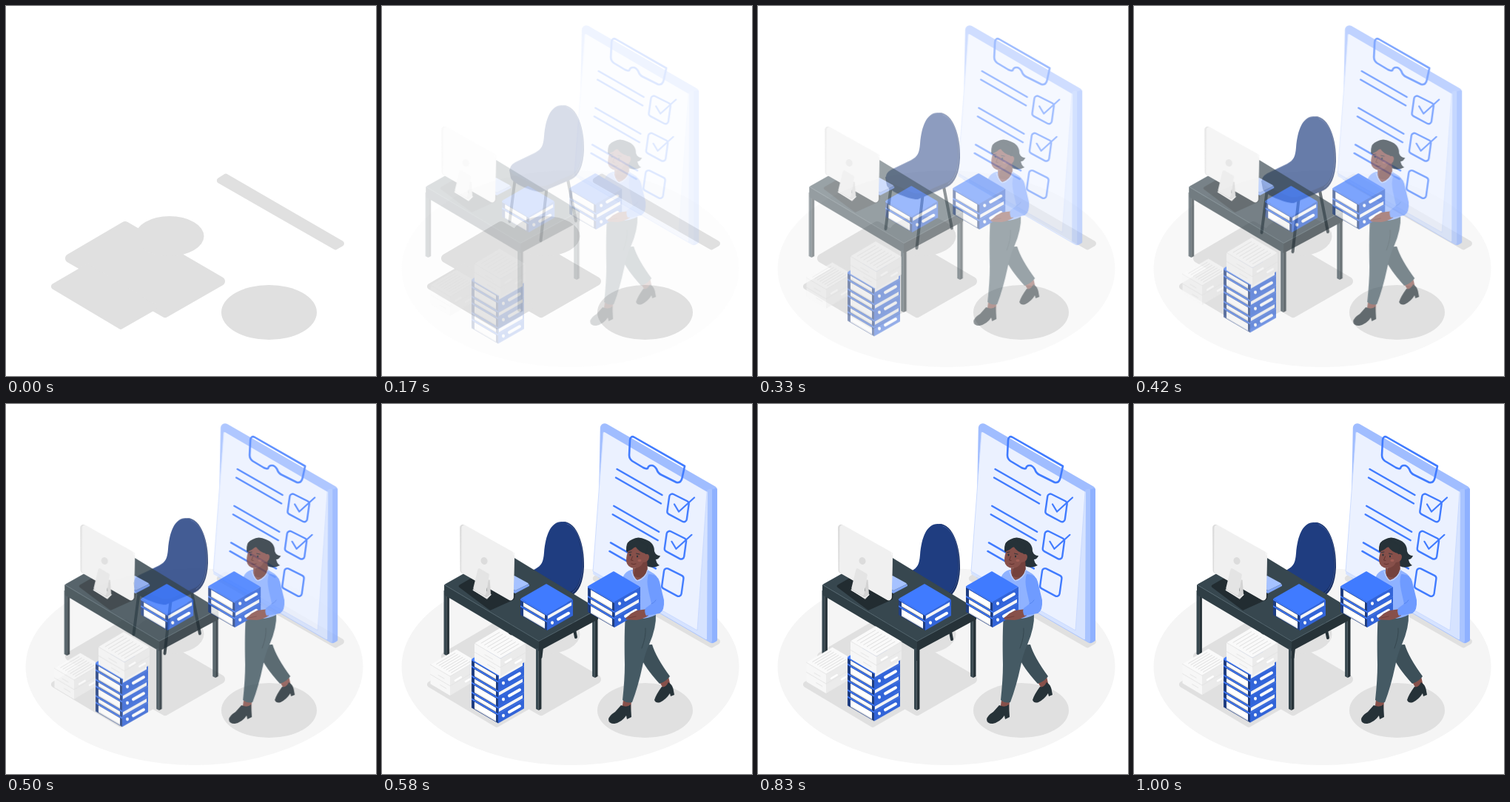
An HTML page with a canvas that plays this animation: 500x500 px, repeating every 1.04 s.

```html
<!DOCTYPE html>
<html lang="en">
<head>
<meta charset="utf-8">
<title>Office move</title>
<style>
html, body { margin: 0; width: 100%; height: 100%; overflow: hidden; background: #fff; }
canvas { display: block; width: 100vw; height: 100vh; }
</style>
</head>
<body>
<canvas id="stage"></canvas>
<script>
const SIZE = 500, LOOP = 1040, STEP = 1000 / 24;
const SLIDE = 30, FLOAT = 3, START = 80, RISE = 500, REST = 1;
const BLUE = '#407bff', SPINE = '#3264d8', NAVY = '#1f3d80';
const DARK = '#263238', SLATE = '#37474f', STEEL = '#455a64', SKIN = '#87504a';
const dpr = Math.max(1, window.devicePixelRatio || 1);

const stage = document.getElementById('stage');
const view = prepare(stage);
let c = view;

function prepare(canvas) {
  canvas.width = canvas.height = SIZE * dpr;
  const ctx = canvas.getContext('2d');
  ctx.scale(dpr, dpr);
  ctx.lineCap = ctx.lineJoin = 'round';
  return ctx;
}

// Draws a group once, flattened, so that it can fade as a whole.
function layer(draw) {
  const canvas = document.createElement('canvas');
  c = prepare(canvas);
  draw();
  c = view;
  return canvas;
}

function shape(color, d) {
  c.fillStyle = color;
  c.fill(new Path2D(d));
}

function line(color, width, d) {
  c.strokeStyle = color;
  c.lineWidth = width;
  c.stroke(new Path2D(d));
}

function oval(color, x, y, rx, ry = rx, turn = 0) {
  c.fillStyle = color;
  c.beginPath();
  c.ellipse(x, y, rx, ry, turn, 0, Math.PI * 2);
  c.fill();
}

// Closed path with rounded corners through flat x, y pairs.
function trace(r, p) {
  const n = p.length;
  c.beginPath();
  c.moveTo((p[n - 2] + p[0]) / 2, (p[n - 1] + p[1]) / 2);
  for (let i = 0; i < n; i += 2) {
    const j = (i + 2) % n;
    c.arcTo(p[i], p[i + 1], (p[i] + p[j]) / 2, (p[i + 1] + p[j + 1]) / 2, r);
  }
  c.closePath();
}

function poly(color, r, ...p) {
  trace(r, p);
  c.fillStyle = color;
  c.fill();
}

function outline(color, width, r, ...p) {
  trace(r, p);
  c.strokeStyle = color;
  c.lineWidth = width;
  c.stroke();
}

// Vertical iso wall from (x, y), spanning dx, dy and falling by h.
function wall(color, x, y, dx, dy, h) {
  poly(color, 0, x, y, x + dx, y + dy, x + dx, y + dy + h, x, y + h);
}

function binder(x, y, thick) {
  const h = thick ? 13 : 9;
  wall(NAVY, x, y, -36, -21, h);
  wall(SPINE, x, y, 35, -20, h);
  wall('#fff', x - 3, y + 1, -29, -17, h - 3.5);
  wall('#e0e0e0', x - 3, y + h - 4, -29, -17, 1);
  wall(BLUE, x, y, -36, -21, 2);
  if (thick) {
    line('#fff', 4, `M${x + 15} ${y - 2.2}L${x + 29} ${y - 10.2}`);
    oval('#fff', x + 7, y + 2.6, 2, 2.4);
  } else {
    wall('#f5f5f5', x + 1, y + 2, 32, -18.3, 4.5);
  }
  poly(BLUE, 1, x, y, x - 36, y - 21, x - 1, y - 41, x + 35, y - 20);
}

// Bottom binder first; each letter is a thick (A) or thin (B) one.
function pile(x, y, kinds) {
  for (const k of kinds) {
    y -= k === 'A' ? 13 : 9;
    binder(x, y, k === 'A');
  }
}

function paperBox(x, y, w, d, h) {
  const a = w * .59, b = d * .59;
  wall('#f7f7f7', x, y, -w, -a, h);
  wall('#ebebeb', x, y, d, -b, h);
  poly('#fafafa', 1, x, y, x - w, y - a, x - w + d, y - a - b, x + d, y - b);
  for (let i = 1; i < 8; i++) {
    const q = i / 8, px = x - w * q, py = y - a * q;
    line('#dcdcdc', .9, `M${px + d * .14} ${py - b * .14}L${px + d * .86} ${py - b * .86}`);
  }
  line('#e3e3e3', .8, `M${x - w} ${y - a}L${x} ${y}L${x + d} ${y - b}M${x - w} ${y - a + h / 2}L${x} ${y + h / 2}L${x + d} ${y - b + h / 2}`);
  line('#fff', 2.6, `M${x + d * .2} ${y + h * .38 - b * .2}l${d * .22} ${-b * .22}M${x + d * .6} ${y + h * .75 - b * .6}l${d * .22} ${-b * .22}`);
  line('#e6e6e6', 1, `M${x - w * .6} ${y + h * .3 - a * .6}l${w * .3} ${a * .3}M${x - w * .5} ${y + h * .75 - a * .5}l${w * .3} ${a * .3}`);
}

function floor() {
  oval('#f5f5f5', 254.5, 355, 228, 133);
}

function shadows() {
  const g = '#e0e0e0';
  poly(g, 4, 281, 236, 297, 226, 461, 321, 445, 330);
  poly(g, 6, 74, 341, 161, 290, 302, 372, 215, 422);
  poly(g, 4, 57, 379, 110, 348, 208, 407, 155, 437.5);
  oval(g, 221, 311, 46.5, 27);
  oval(g, 355.5, 414, 64.5, 37);
}

function checkbox(x, y, ticked) {
  outline(BLUE, 2.4, 4, x, y, x + 26, y + 13, x + 22, y + 42, x - 4, y + 28);
  if (ticked) line(BLUE, 2.2, `M${x + 6} ${y + 16}L${x + 12} ${y + 26}L${x + 33} ${y + 7}`);
}

function board() {
  poly('#a0bdff', 6, 296, 22, 454, 113, 454, 320, 447, 324, 292, 234);
  poly('#8fb1ff', 2, 446, 116, 454, 113, 454, 320, 446, 324);
  poly('#a9c4ff', 2, 440, 116, 447, 114, 447, 323, 440, 320);
  poly('#d6e3ff', 1, 300, 38, 441, 119, 440, 319, 286, 230);
  poly('#ebf1ff', 1.5, 300, 37, 440, 119, 427, 306, 286, 226);
  line('#c6d7ff', .8, 'M440 119L427 306L286 226L300 38');
  for (let i = 0; i < 3; i++) {
    const x = 318.5 - 4.3 * i, y = 88 + 49.7 * i;
    line(BLUE, 2.4, `M${x} ${y}l61 35M${x - 1.5} ${y + 11.5}l61 35`);
    checkbox(390 - 3.6 * i, 119.5 + 50.3 * i, i < 2);
  }
  line(BLUE, 2.6, 'M410 84L406.5 100Q405 107 399 106L379 96Q374 94 372 88Q369 83 365 83Q361 83 360 87Q358 88 354 86L339 77Q335 74 335 69L336 49Q337 42 342 45Z');
}

function chair() {
  line(DARK, 4, 'M180 258L172.5 317M223 268L214.5 343M250 255L262 316');
  shape('#172e62', 'M245 160C264 160 274 192 273 221C272 242 266 255 256 260L216 277C207 278 176 266 174 258L172 247L214 222Z');
  shape(NAVY, 'M243 160C228 160 221 178 219 202C218 214 216 219 207 224L180 237C170 243 171 251 182 256L209 268C218 271 226 268 237 262L256 254C266 249 270 234 270 217C270 188 262 160 243 160Z');
  line('#4c6bae', .7, 'M250 163C266 168 272 194 271 222C270 238 266 250 257 256');
}

function leg(x, top, bottom) {
  poly(SLATE, 0, x - 3.7, top, x, top, x, bottom + 1, x - 3.7, bottom - 1);
  poly(DARK, 0, x, top, x + 3.7, top, x + 3.7, bottom - 1, x, bottom + 1);
}

function monitor() {
  poly('#222c31', 2, 103, 246, 136, 227, 181, 255, 180, 264, 147, 279);
  poly('#7fa4f5', 1, 160, 244, 181, 252, 200, 243, 200, 246, 181, 256, 160, 247);
  poly('#a6c2ff', 1, 160, 241, 181, 252, 200, 243, 180, 232);
  poly('#dcdcdc', 4, 106, 160, 180, 201, 178.5, 268, 106.5, 227);
  poly('#f0f0f0', 4, 108.5, 160.5, 180, 201, 178.5, 268, 108, 227.5);
  line('#fff', .8, 'M110 161.5L177 199Q179 200 179 204');
  oval('#dcdcdc', 139, 212, 4.5, 5, -.3);
  poly('#cfcfcf', 1, 123, 251, 131, 246, 149, 257, 143, 264);
  poly('#e4e4e4', 2, 131, 221, 146, 230, 141, 260, 124, 250);
  poly('#d3d3d3', 1, 146, 230, 148, 257, 141, 261);
  line('#fafafa', 1, 'M124 251.5L142 262L148 258');
}

function desk() {
  leg(88.2, 252, 339);
  leg(288.8, 284, 369);
  wall(DARK, 213, 320, 80, -43, 14);
  wall('#2f3e45', 213, 320, -128, -76, 14);
  leg(212.7, 330, 413);
  poly(SLATE, 1, 85, 244, 165, 199, 293, 277, 213, 320.5);
  line('#566971', .8, 'M85.5 244.5L213 320.5L292.5 277.5');
  monitor();
  pile(224, 306, 'AB');
}

function stacks() {
  paperBox(92, 367, 26.5, 35, 26);
  pile(157, 430.5, 'ABABAB');
  paperBox(160, 343, 35, 34, 24);
}

function legs() {
  shape(SKIN, 'M375 374L388 368L391 382L382 386ZM327 400L338 401L337 415L325 414Z');
  shape(DARK, 'M379 382Q384 384 388 376Q393 379 394.5 385L396 393L391 395L390 391Q385 399 377 403Q371 405 369 400Q371 393 379 382Z');
  shape(DARK, 'M324 407Q332 411 337 406L338 423L332 426L331 421Q325 430 315 432Q307 432 307 426Q308 421 316 416Z');
  shape('#3d5059', 'M349 326L366 325Q371 342 390 368Q385 375 376 378Q356 356 350 341Z');
  shape(STEEL, 'M330 284L371 283Q372 302 362 325Q356 338 353 354Q347 382 339 403Q332 405 326 400Q329 372 329 352Q328 310 330 284Z');
  line('#35474f', .9, 'M352 330Q358 314 357 303');
}

function head() {
  shape(DARK, 'M331 199Q330 186 339 183Q347 178 357 183Q369 187 369 199Q371 205 377 205Q375 210 371 210Q372 216 376 218Q367 223 359 219L348 214Z');
  shape('#74423d', 'M345 214L359 208L360 226Q353 239 341 232Z');
  shape(SKIN, 'M335 196Q331 203 331 212Q332 220 341 222Q350 222 354 214Q361 214 362 207Q362 202 357 203L351 191Z');
  shape(DARK, 'M331 199Q338 199 343 192Q348 200 357 202L360 192L345 183L333 187Z');
  oval(DARK, 336.5, 204, 1, 1.4);
  oval(DARK, 346, 206, 1, 1.4);
  line(DARK, .9, 'M334.5 200.5L338 200M344.5 202L349 203');
  line('#5e302d', .9, 'M339.5 206L337.5 211L340 211.5M338 216Q341 217.5 344 216');
  oval('#a15d55', 349, 211.5, 2.6, 1.8);
}

function woman() {
  legs();
  shape('#8fb2ff', 'M338 224Q330 226 327 233L324 252L333 287Q353 294 371 285L374 250Q376 234 368 229L358 223Z');
  shape(SKIN, 'M340 222L359 222Q356 236 346 238Q339 234 340 222Z');
  head();
  line('#bdd1ff', 1.2, 'M338 226Q341 236 346 239Q357 236 360 224');
  pile(315, 302, 'ABA');
  shape(SKIN, 'M360 277L345 279Q338 282 333 287Q328 290 332 291.5L345 292Q353 291 361 286Z');
  line('#6d3d39', .8, 'M334 289L344 287');
  shape('#6f9bff', 'M361 230Q373 229 376 240L382 265Q383 279 376 283L358 286Q355 281 357 276L365 270L361 252Q358 238 361 230Z');
  line('#5584ee', .9, 'M365 270Q369 269 371 265');
}

// dx, dy: the direction in which a group travels.
const ground = layer(floor), shade = layer(shadows);
const groups = [
  { art: layer(board), dx: 1, dy: 0 },
  { art: layer(chair), dx: 0, dy: 1 },
  { art: layer(desk), dx: 1, dy: 0 },
  { art: layer(stacks), dx: 0, dy: -1 },
  { art: layer(woman), dx: 1, dy: 0 }
];

const clamp = v => Math.min(1, Math.max(0, v));

function put(art, alpha, x = 0, y = 0) {
  view.globalAlpha = alpha;
  view.drawImage(art, x, y, SIZE, SIZE);
}

function render(ms) {
  const tick = Math.min(24, Math.floor((ms % LOOP + 6) / STEP));
  const t = tick * STEP;
  const shown = clamp((t - START) / RISE);
  const sway = clamp((t - START - RISE) / RISE);
  const shift = SLIDE * (shown - 1) + FLOAT * (1 - Math.abs(2 * sway - 1)) - REST;

  view.globalAlpha = 1;
  view.fillStyle = '#fff';
  view.fillRect(0, 0, SIZE, SIZE);
  put(ground, shown);
  put(shade, 1);
  for (const g of groups) put(g.art, shown, g.dx * shift, g.dy * shift);
}

let began;
function run(now) {
  began ??= now;
  render(now - began);
  requestAnimationFrame(run);
}
render(0);
requestAnimationFrame(run);
</script>
</body>
</html>
```
